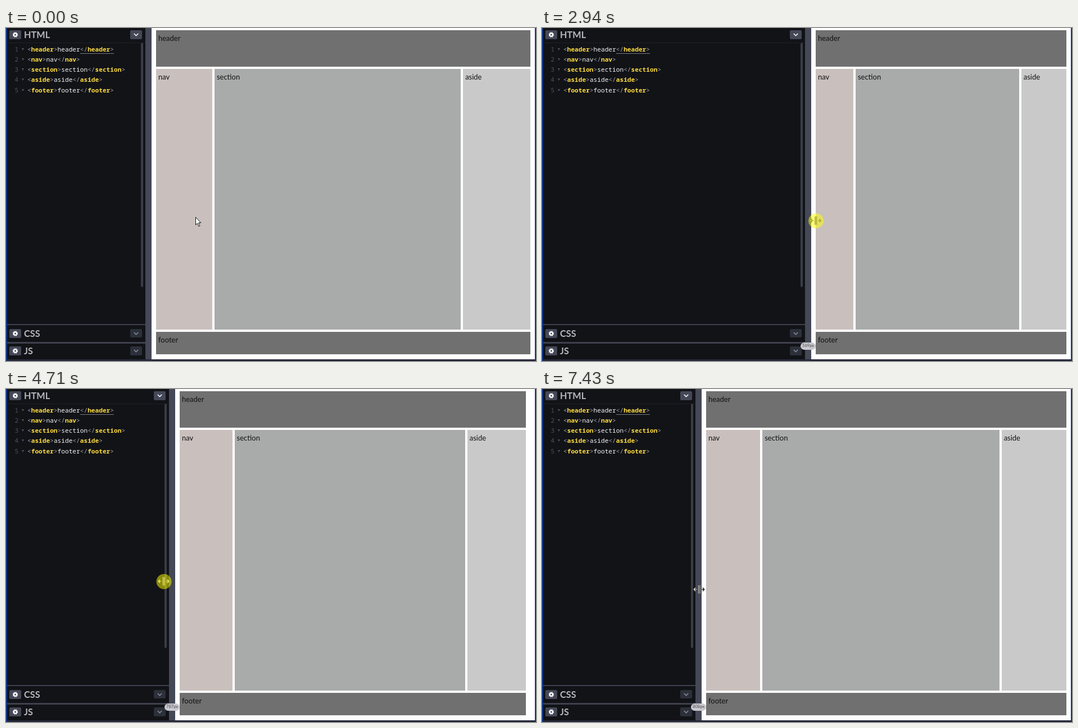
Animation, 943 px wide and 594 px high, one loop 7840 ms. Source, as an HTML page:

```html
<!DOCTYPE html>
<html lang="en">
<head>
<meta charset="utf-8">
<title>Resizable layout</title>
<style>
html, body { margin: 0; width: 100%; height: 100%; overflow: hidden; background: #131417; }
#stage {
  --d: 248px;
  position: relative; width: 943px; height: 594px; overflow: hidden;
  font-family: Lato, sans-serif;
}
#stage div, #stage svg { position: absolute; box-sizing: border-box; }

.editor { left: 0; top: 0; width: var(--d); height: 591px; background: #121317; overflow: hidden; }
.bar { left: 0; width: 100%; height: 24px; color: #b4b6bb; font: 700 16.3px/24px Lato, sans-serif; }
.bar span { position: absolute; left: 32px; }
.bar .gear { left: 6px; top: 4px; width: 21px; height: 16px; background: #444857; border-radius: 2px; }
.bar .fold { left: calc(var(--x, var(--d)) - 27px); top: 4px; width: 21px; height: 15.5px; background: #2c303a; border-radius: 2px; color: #8c8f9a; }
.bar.open .fold { background: #444857; color: #fff; }
.rule { left: 0; width: 100%; background: #3e414d; }
.scroll { left: calc(var(--d) - 8px); top: 26px; width: 4px; height: 436px; background: #3a3d47; border-radius: 2px; }

.code { left: 0; top: 29.2px; font: 11.17px/18.1px "Noto Sans Mono", monospace; color: #f4f4f4; white-space: pre; }
.code p { position: relative; margin: 0; padding-left: 38px; }
.code p::before { content: attr(data-n); position: absolute; left: 15.5px; color: #4e515c; }
.code p::after {
  content: ""; position: absolute; left: 28px; top: 7px;
  border: solid transparent; border-width: 4px 2.5px 0; border-top-color: #50535d;
}
.code i { font-style: normal; color: #a2a5ad; }
.code b { color: #ffdd40; }
.code u { text-decoration: none; box-shadow: 0 1px #777a80; }
.code br { display: none; }
.wrap .code br { display: inline; }

.divider { left: var(--d); top: 0; width: 11px; height: 591px; background: #444857; }
.preview { left: calc(var(--d) + 11px); top: 0; right: 2px; height: 591px; background: #fff; color: #111; font-size: 13px; line-height: 20px; }
.preview .box { left: 8px; right: 8px; padding: 4px; background: #707070; }
.preview .row { left: 8px; right: 8px; top: 73px; height: 465px; display: flex; gap: 4px; }
.row > * { box-sizing: border-box; padding: 4px; }
.row nav { width: 15%; flex: none; background: #c9c0be; }
.row section { flex: 1; background: #a9abaa; }
.row aside { width: 18%; flex: none; background: #c8c9c8; }
.unpainted { right: 0; top: 0; width: 16px; height: 100%; background: #fff; }

.size {
  left: calc(var(--d) - 8px); top: 561px; width: 27px; height: 12.5px; border-radius: 7px;
  background: #c8c8ce; color: #4a4a50; font-size: 7.5px; line-height: 12px; text-align: center;
}
.edge { top: 0; width: 2px; height: 594px; background: #0b3285; }
.foot { left: 0; top: 591px; width: 100%; height: 3px; background: #25283a; }

#arrow, #resize, #halo { left: 0; top: 0; overflow: visible; }
#resize { mix-blend-mode: difference; }
#halo { width: 27px; height: 27px; margin: -13.5px; border-radius: 50%; background: rgba(255, 255, 0, .5); }
</style>
</head>
<body>
<div id="stage">
  <div class="editor">
    <div class="code" id="code"></div>
    <div class="scroll"></div>
    <div class="rule" style="top:26px;height:1px;background:#1f2126"></div>
    <div class="rule" style="top:528px;height:2px"></div>
    <div class="rule" style="top:560px;height:2.5px"></div>
    <div id="bars"></div>
  </div>
  <div class="divider"></div>
  <div class="preview">
    <div class="box" style="top:4px;height:65px">header</div>
    <div class="row"><nav>nav</nav><section>section</section><aside>aside</aside></div>
    <div class="box" style="top:542px;height:40px">footer</div>
    <div class="unpainted" id="unpainted"></div>
  </div>
  <div class="size" id="size"></div>
  <div class="foot"></div>
  <div class="edge" style="left:0"></div>
  <div class="edge" style="right:0"></div>
  <svg id="arrow" width="12" height="19">
    <path d="M.5 .5V14.2L3.6 11.3L5.8 16.8L8 15.9L5.7 10.5H9.8Z" fill="#fff" stroke="#111"/>
  </svg>
  <svg id="resize" width="1" height="1">
    <path d="M-1 -7.5V7.5M1.5 -7.5V7.5M-4 0H-9M-6.5 -3L-9.2 0L-6.5 3M4 0H9M6.5 -3L9.2 0L6.5 3" fill="none" stroke="#fff" stroke-width="1.2"/>
  </svg>
  <div id="halo"></div>
</div>
<script>
const LOOP = 7840, TICK = 1000 / 13;
const $ = id => document.getElementById(id);
const stage = $("stage");

const gear = `<svg width="21" height="16" fill="none" stroke="#fff">
  <circle cx="10.5" cy="8" r="2.6" stroke-width="2.2"/>
  <circle cx="10.5" cy="8" r="4" stroke-width="1.4" stroke-dasharray="1.7 1.4416"/></svg>`;
const chevron = `<svg width="21" height="16" fill="none" stroke="currentColor" stroke-width="1.6">
  <path d="M6.8 6L10.5 9.7L14.2 6"/></svg>`;
const bar = (name, y, cls = "") => `<div class="bar ${cls}" style="top:${y - 12}px">
  <div class="gear">${gear}</div><span>${name}</span><div class="fold">${chevron}</div></div>`;

$("bars").style.cssText = "left:0;top:0;width:100%;height:591px";
$("bars").innerHTML = bar("HTML", 12, "open") + bar("CSS", 544.5, "css") + bar("JS", 576);
const cssBar = document.querySelector(".css");

$("code").innerHTML = ["header", "nav", "section", "aside", "footer"].map((tag, n) => {
  const endName = tag === "section" ? "secti<br>on" : tag;
  const end = `<i>&lt;/</i><b>${endName}</b><i>&gt;</i>`;
  return `<p data-n="${n + 1}"><i>&lt;</i><b>${tag}</b><i>&gt;</i>${tag}${n ? end : `<u>${end}</u>`}</p>`;
}).join("");

// Monotone cubic curve through [time, value] points, flat outside them.
function curve(points) {
  const last = points.length - 1;
  const slope = k => (points[k + 1][1] - points[k][1]) / (points[k + 1][0] - points[k][0]);
  const tangent = k => {
    if (k === 0 || k === last) return 0;
    const a = slope(k - 1), b = slope(k);
    return a * b > 0 ? 2 * a * b / (a + b) : 0;
  };
  return t => {
    if (t <= points[0][0]) return points[0][1];
    if (t >= points[last][0]) return points[last][1];
    const k = points.findIndex(p => p[0] > t) - 1;
    const [t0, v0] = points[k], [t1, v1] = points[k + 1];
    const h = t1 - t0, u = (t - t0) / h, w = 1 - u;
    return v0 * (1 + 2 * u) * w * w + v1 * u * u * (3 - 2 * u)
      + h * u * w * (tangent(k) * w - tangent(k + 1) * u);
  };
}

const divider = curve([[2173, 248], [2940, 467], [3020, 500], [3710, 640], [3803, 640], [4170, 542],
  [4630, 321], [5120, 178], [6000, 178], [6410, 268], [6490, 280], [6720, 293], [7260, 273]]);
const arrowX = curve([[293, 337], [1150, 261], [1300, 259]]);
const arrowY = curve([[293, 337], [1150, 326], [1300, 325.5]]);
const gripX = curve([[1540, 257], [1760, 255], [2000, 254], [2173, 254], [2940, 486], [3020, 514],
  [3710, 647], [3803, 647], [4170, 540.5], [4630, 309], [5400, 94], [5480, 80], [5550, 74],
  [5640, 74], [6410, 283], [6490, 293], [6720, 300], [7260, 279.5]]);
const gripY = curve([[1760, 325.5], [2173, 325.5], [2940, 343.5], [4170, 343], [5400, 343.5],
  [5640, 344], [6410, 356.5], [7260, 357.5]]);

const show = (id, on) => { $(id).style.display = on ? "" : "none"; };
const place = (id, x, y) => { $(id).style.transform = `translate(${x}px, ${y}px)`; };
const half = v => Math.round(v * 2) / 2;

function draw(now) {
  const t = now % LOOP;
  const q = Math.max(0, Math.floor((t - 12) / TICK) * TICK + 20);
  const d = Math.round(divider(q));

  stage.style.setProperty("--d", d + "px");
  cssBar.style.setProperty("--x", Math.max(d, 189) + "px");
  stage.classList.toggle("wrap", d < 210);
  $("size").textContent = Math.round((942 - d - 11) * 1.228) + "px";

  show("size", t >= 2250);
  show("unpainted", t >= 3880 && t < 4950);
  show("arrow", t < 1540);
  show("resize", t >= 1540);
  show("halo", t >= 2000 && t < 7430);

  const x = half(gripX(q)), y = half(gripY(q));
  place("arrow", Math.round(arrowX(q)), Math.round(arrowY(q)));
  place("resize", x, y);
  place("halo", x, y);
}

let start;
function loop(now) {
  start ??= now;
  draw(now - start);
  requestAnimationFrame(loop);
}
draw(0);
requestAnimationFrame(loop);
</script>
</body>
</html>
```
